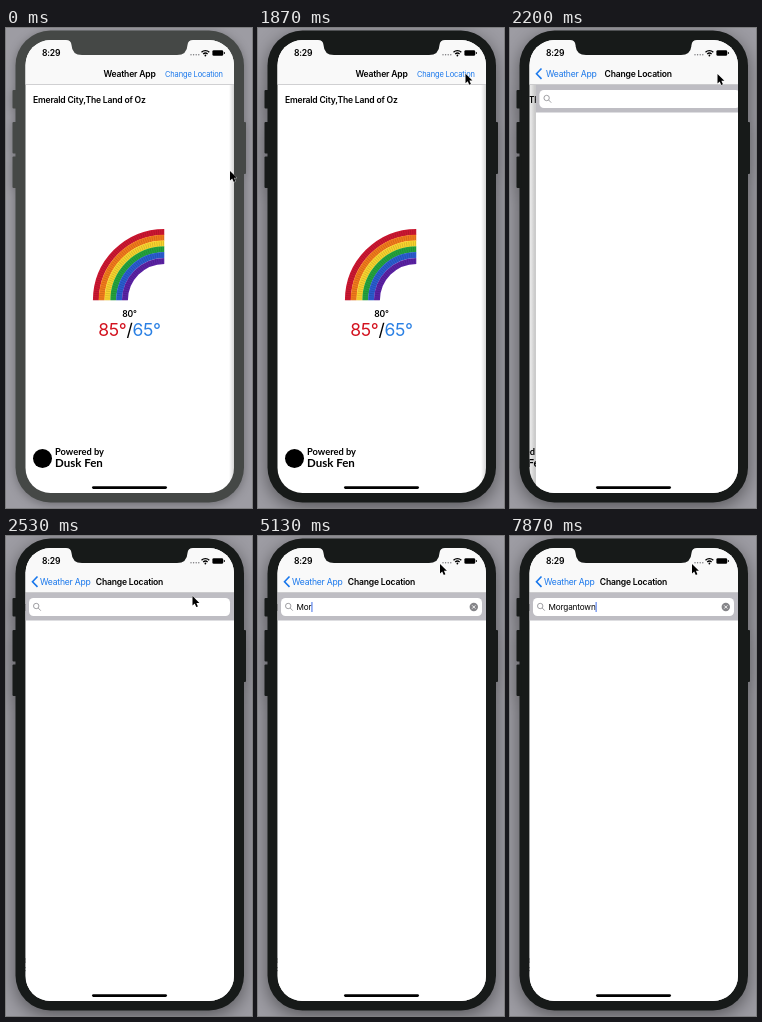
Recreate the animation shown at these times as an HTML page. Size 246x480 px, loop 8 s.

```html
<!DOCTYPE html>
<html lang="en">
<head>
<meta charset="utf-8">
<title>Weather App</title>
<style>
  html, body { margin: 0; width: 100%; height: 100%; overflow: hidden; background: #9d9ca3; }
  svg { display: block; width: 246px; height: 480px; }
  text { font: 8.6px Inter, Roboto, sans-serif; letter-spacing: -.2px; }
  .bold { font-weight: 600; }
  .mid { text-anchor: middle; }
  .blue { fill: #1877ec; }
  #button { font-size: 7.5px; letter-spacing: -.15px; }
  #range { font-size: 17.5px; letter-spacing: -.3px; }
  #query { font-size: 8.2px; letter-spacing: -.15px; }
  #credit text { font: 700 9.3px Lato, sans-serif; letter-spacing: 0; }
  #credit .brand { font-size: 11.5px; }
  #phone { fill: #454846; filter: drop-shadow(0 2px 5px rgba(0, 0, 0, .3)); }
  #notch { fill: #454846; }
  .active #phone { fill: #171a19; filter: drop-shadow(0 5px 9px rgba(0, 0, 0, .45)); }
  .active #notch { fill: #171a19; }
</style>
</head>
<body>
<svg id="stage" viewBox="0 0 246 480">
  <defs>
    <clipPath id="screen"><rect x="19.5" y="12" width="208.5" height="453" rx="25"/></clipPath>
    <clipPath id="photo"><rect x="86" y="200.5" width="72.5" height="72"/></clipPath>
    <linearGradient id="edge">
      <stop offset="0" stop-opacity="0"/>
      <stop offset="1" stop-opacity=".16"/>
    </linearGradient>
  </defs>
  <rect width="246" height="480" fill="#9d9ca3"/>
  <g id="phone">
    <rect x="9.5" y="2.5" width="228.5" height="472" rx="35"/>
    <rect x="6.5" y="62" width="5" height="18.5" rx="1"/>
    <rect x="6.5" y="94" width="5" height="31.5" rx="1"/>
    <rect x="6.5" y="128.5" width="5" height="31.5" rx="1"/>
    <rect x="236" y="94" width="4" height="52" rx="1"/>
  </g>
  <g clip-path="url(#screen)">
    <rect x="19" y="12" width="210" height="454" fill="#fff"/>

    <g id="home">
      <text class="bold" x="27" y="75">Emerald City,The Land of Oz</text>
      <g id="rainbow" clip-path="url(#photo)" fill="none"></g>
      <text class="bold mid" x="123.5" y="288.5">80°</text>
      <text id="range" class="mid" x="123.5" y="307.5"><tspan fill="#d3121f">85°</tspan>/<tspan fill="#2b80e4">65°</tspan></text>
      <g id="credit">
        <circle cx="36.5" cy="430.5" r="9.5"/>
        <text x="49" y="426.5">Powered by</text>
        <text class="brand" x="49" y="438.5">Dusk Fen</text>
      </g>
    </g>
    <rect id="dim" x="19" y="56" width="210" height="410"/>

    <g id="search">
      <rect x="14.5" y="57" width="5" height="409" fill="url(#edge)"/>
      <rect x="19.5" y="57" width="209" height="409" fill="#fff"/>
      <rect x="19.5" y="57" width="209" height="27.5" fill="#bebdc3"/>
      <rect x="23" y="62" width="201" height="18" rx="4.5" fill="#fff"/>
      <g fill="none" stroke="#8a8a8f" stroke-width=".8">
        <circle cx="30.2" cy="70" r="2.7"/>
        <path d="M32.2 72l2.6 2.7"/>
      </g>
      <text id="query" x="38.5" y="74"></text>
      <rect id="caret" width="1" fill="#3f6ee8"/>
      <g id="clear">
        <circle cx="215.8" cy="71" r="4.2" fill="#858589"/>
        <path d="M214.2 69.4l3.2 3.2m0-3.2l-3.2 3.2" stroke="#fff" stroke-width=".9"/>
      </g>
    </g>

    <rect x="19" y="12" width="210" height="44.5" fill="#f9f9f9"/>
    <rect x="19" y="56.2" width="210" height=".6" fill="#b5b5b8"/>
    <path id="chevron" d="M31.5 40.5l-5 5.2 5 5.2" fill="none" stroke="#1877ec" stroke-width="1.6"/>
    <g id="back">
      <text id="backBold" class="bold mid" y="49">Weather App</text>
      <text id="backBlue" class="blue mid" y="49">Weather App</text>
    </g>
    <text id="title" class="bold mid" y="49">Change Location</text>
    <text id="button" class="blue" x="159" y="48.5">Change Location</text>

    <text class="bold" x="36" y="28">8:29</text>
    <g fill="#77777b">
      <circle cx="185" cy="26.7" r=".7"/><circle cx="187.6" cy="26.7" r=".7"/>
      <circle cx="190.2" cy="26.7" r=".7"/><circle cx="192.8" cy="26.7" r=".7"/>
    </g>
    <g fill="none" stroke="#000" stroke-width="1.3">
      <path d="M195.5 24.2a5.5 5.5 0 0 1 7.8 0M197.2 26a3.2 3.2 0 0 1 4.4 0"/>
    </g>
    <circle cx="199.4" cy="27.5" r=".9"/>
    <rect x="206.4" y="22.2" width="10.8" height="5.6" rx="1.4"/>
    <rect x="217.8" y="24" width="1" height="2" rx=".5"/>
    <rect x="86" y="458.2" width="75" height="2.8" rx="1.4"/>
  </g>
  <path id="notch" d="M60 11H187V12Q182 12 181.5 17Q181 27 171 27H76Q66 27 65.5 17Q65 12 60 12Z"/>
  <path id="cursor" d="M0 0V9.5L2.2 7.4 3.8 11 5.4 10.3 3.9 6.8H6.9Z" stroke="#fff" stroke-width=".7" paint-order="stroke"/>
</svg>
<script>
const LOOP = 8000, WIDTH = 208.5;
const $ = id => document.getElementById(id);
const set = (id, attrs) => {
  for (const key in attrs) $(id).setAttribute(key, attrs[key]);
};
const clamp = v => Math.min(1, Math.max(0, v));
const mix = (a, b, k) => a + (b - a) * k;
const smooth = k => k * k * (3 - 2 * k);
const span = (t, from, to) => clamp((t - from) / (to - from));

// Pointer stops: time, x, y
const pointer = [
  [0, 224, 143], [220, 224, 143], [1000, 206.5, 47], [1340, 206.5, 47],
  [1470, 207.5, 45.5], [2250, 207.5, 46], [2730, 174, 68.5], [2870, 174, 68.5],
  [3070, 174, 70], [3600, 174, 70], [3870, 182, 28], [LOOP, 182, 28]
];
const word = "Morgantown";
const keys = [4400, 5070, 5130, 5730, 6000, 6330, 6870, 7070, 7200, 7800];

// Stitched quarter rings, outermost first
const bands = ["#cc1731", "#f17a1c", "#f7d32e", "#24a33e", "#2a5ccf", "#5b22a4"];
$("rainbow").innerHTML = bands.map((color, i) => {
  const r = 68.6 - i * 5.8;
  const arc = `M${158.5 - r} 272.5A${r} ${r} 0 0 1 158.5 ${272.5 - r}`;
  return `<path d="${arc}" stroke="${color}" stroke-width="6"/>` +
    `<path d="${arc}" stroke="#000" stroke-opacity=".14" stroke-width="4.6" stroke-dasharray=".8 1.4"/>`;
}).join("");

function pointerAt(t) {
  const i = pointer.findIndex(stop => stop[0] > t);
  const a = pointer[i - 1], b = pointer[i];
  const k = smooth(span(t, a[0], b[0]));
  return [mix(a[1], b[1], k), mix(a[2], b[2], k)];
}

// Share of the push still to go, a critically damped spring
function pushLeft(t) {
  const s = Math.max(0, t - 1981) * .0242;
  return (1 + s) * Math.exp(-s);
}

function drawPush(t) {
  const left = pushLeft(t), done = 1 - left;
  set("home", { transform: `translate(${-.3 * WIDTH * done})` });
  set("dim", { opacity: .1 * done });
  set("search", { transform: `translate(${WIDTH * left})` });
  set("chevron", { opacity: done });
  set("back", { transform: `translate(${mix(123.5, 59.3, done)})` });
  set("backBold", { opacity: left });
  set("backBlue", { opacity: done });
  set("title", { x: 123.5 + 153 * left, opacity: clamp(done * 1.15) });
  set("button", { opacity: clamp(1 - done * 2) });
}

function drawSearch(t) {
  const typed = word.slice(0, keys.filter(k => k <= t).length);
  const query = $("query");
  if (query.textContent !== typed) query.textContent = typed;
  const end = 38.5 + (typed ? query.getComputedTextLength() : 0);
  const grow = smooth(span(t, 3560, 3800));
  set("caret", {
    x: mix(27, end, grow), y: mix(65, 66, grow),
    height: mix(2, 10, grow), opacity: t < 3590 ? 0 : 1
  });
  set("clear", { opacity: span(t, 4350, 4600) });
}

function draw(t) {
  $("stage").classList.toggle("active", t >= 1870);
  drawPush(t);
  drawSearch(t);
  set("cursor", { transform: `translate(${pointerAt(t)})` });
}

const start = performance.now();
function tick(now) {
  draw(Math.max(0, now - start) % LOOP);
  requestAnimationFrame(tick);
}
draw(0);
requestAnimationFrame(tick);
</script>
</body>
</html>
```
